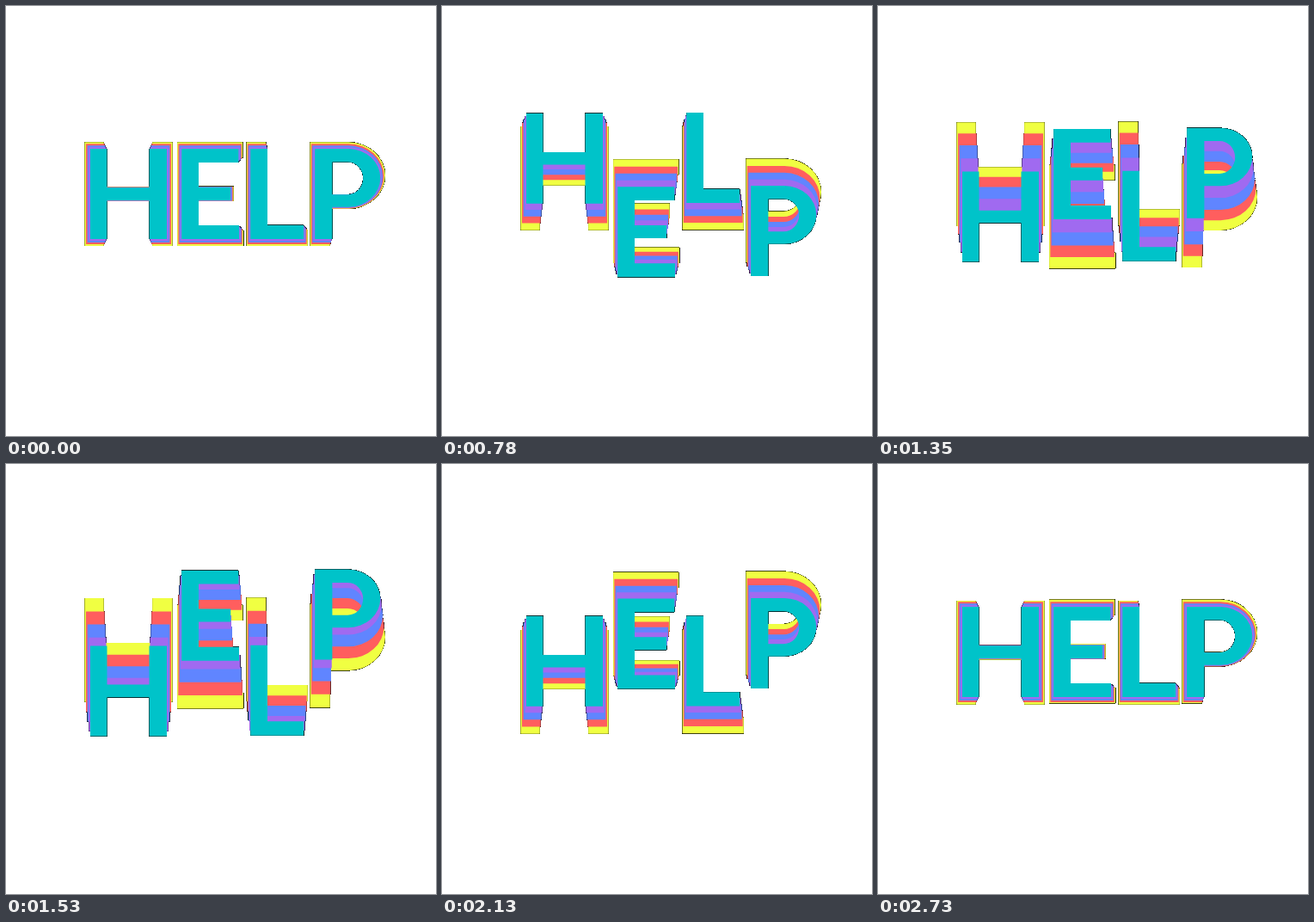
Write an HTML page with a canvas that moves like this. It is 500 by 500 pixels and loops after 2760 ms.

```html
<!DOCTYPE html>
<html lang="en">
<head>
<meta charset="utf-8">
<title>HELP</title>
<style>
  html, body { margin: 0; width: 100%; height: 100%; overflow: hidden; background: #fff; }
  canvas { display: block; width: 500px; height: 500px; }
</style>
</head>
<body>
<canvas id="stage" width="500" height="500" role="img" aria-label="HELP"></canvas>
<script>
const LOOP = 2760, STEP = 30, LAG = 97, TRAVEL = 2370;
const CENTER_Y = 218.6, HALF_HEIGHT = 52.5;

// Back to front; each layer is smaller and moves earlier than the one behind it.
const COLORS = ['#f0ff42', '#ff5e5e', '#6085ff', '#a06af0', '#00c3c9'];

// Vertical travel of a letter: [ms, px]
const TRACK = [
  [30, 0], [90, -1], [187, -5], [285, -11.3], [480, -24], [682, -36], [780, -41.3],
  [803, -42.3], [822, -40.5], [847, -36.8], [945, -25], [1140, -2.5], [1237, 11],
  [1432, 37.5], [1485, 43.6], [1530, 45.3], [1600, 43], [1740, 35], [1935, 22.3],
  [2032, 16.3], [2130, 10.7], [2240, 5], [2310, 1.6], [TRAVEL, 0]
];

// Outlines sit in a box 105 high, x measured from the letter's centre.
const LETTERS = [
  { x: 142.5, dir: 1, drift: 0,
    d: 'M-44.5 0H-25V45.2H24V0H44.5V105H24V59.8H-25V105H-44.5Z' },
  { x: 237.6, dir: -1, drift: 3.3,
    d: 'M-33.5 0H32.8V15.8H-13.6V44.7H23.6V59.8H-13.6V89H33.5V105H-33.5Z' },
  { x: 315.2, dir: 1, drift: -0.8,
    d: 'M-31 0H-11.2V88.6H31V105H-31Z' },
  { x: 397.2, dir: -1, drift: 2,
    d: 'M-38.1 0H1A37.1 33.8 0 0 1 1 67.6H-17.8V105H-38.1Z' +
       'M-17.8 15.3V53.2H0A18 18.95 0 0 0 0 15.3Z' }
].map(letter => ({ ...letter, path: new Path2D(letter.d) }));

const ctx = document.getElementById('stage').getContext('2d', { willReadFrequently: true });

function travel(time) {
  const next = TRACK.findIndex(([t]) => t > time);
  if (next < 1) return 0;
  const [t0, y0] = TRACK[next - 1], [t1, y1] = TRACK[next];
  return y0 + (y1 - y0) * (time - t0) / (t1 - t0);
}

function offset({ dir, drift }, time) {
  const u = Math.min(1, Math.max(0, time / TRAVEL));
  return dir * travel(time) + drift * Math.sin(Math.PI * u);
}

// Soft edge pixels turn solid and dark, which gives the thin black outline.
function hardenEdges() {
  const image = ctx.getImageData(80, 100, 380, 240), px = image.data;
  for (let i = 0; i < px.length; i += 4) {
    const alpha = px[i + 3];
    if (alpha === 0 || alpha === 255) continue;
    for (let c = 0; c < 3; c++) px[i + c] *= alpha / 255;
    px[i + 3] = alpha > 25 ? 255 : 0;
  }
  ctx.putImageData(image, 80, 100);
}

function draw(time) {
  ctx.resetTransform();
  ctx.clearRect(0, 0, 500, 500);
  COLORS.forEach((color, i) => {
    const depth = COLORS.length - 1 - i;
    const scale = 1 + 0.0375 * depth;
    ctx.fillStyle = color;
    for (const letter of LETTERS) {
      const y = CENTER_Y + offset(letter, time - depth * LAG);
      ctx.setTransform(scale, 0, 0, scale, letter.x, y - HALF_HEIGHT * scale);
      ctx.fill(letter.path, 'evenodd');
    }
  });
  hardenEdges();
}

const start = performance.now();
function tick() {
  const time = (performance.now() - start) % LOOP;
  draw(Math.floor(time / STEP) * STEP);
  requestAnimationFrame(tick);
}
tick();
</script>
</body>
</html>
```
